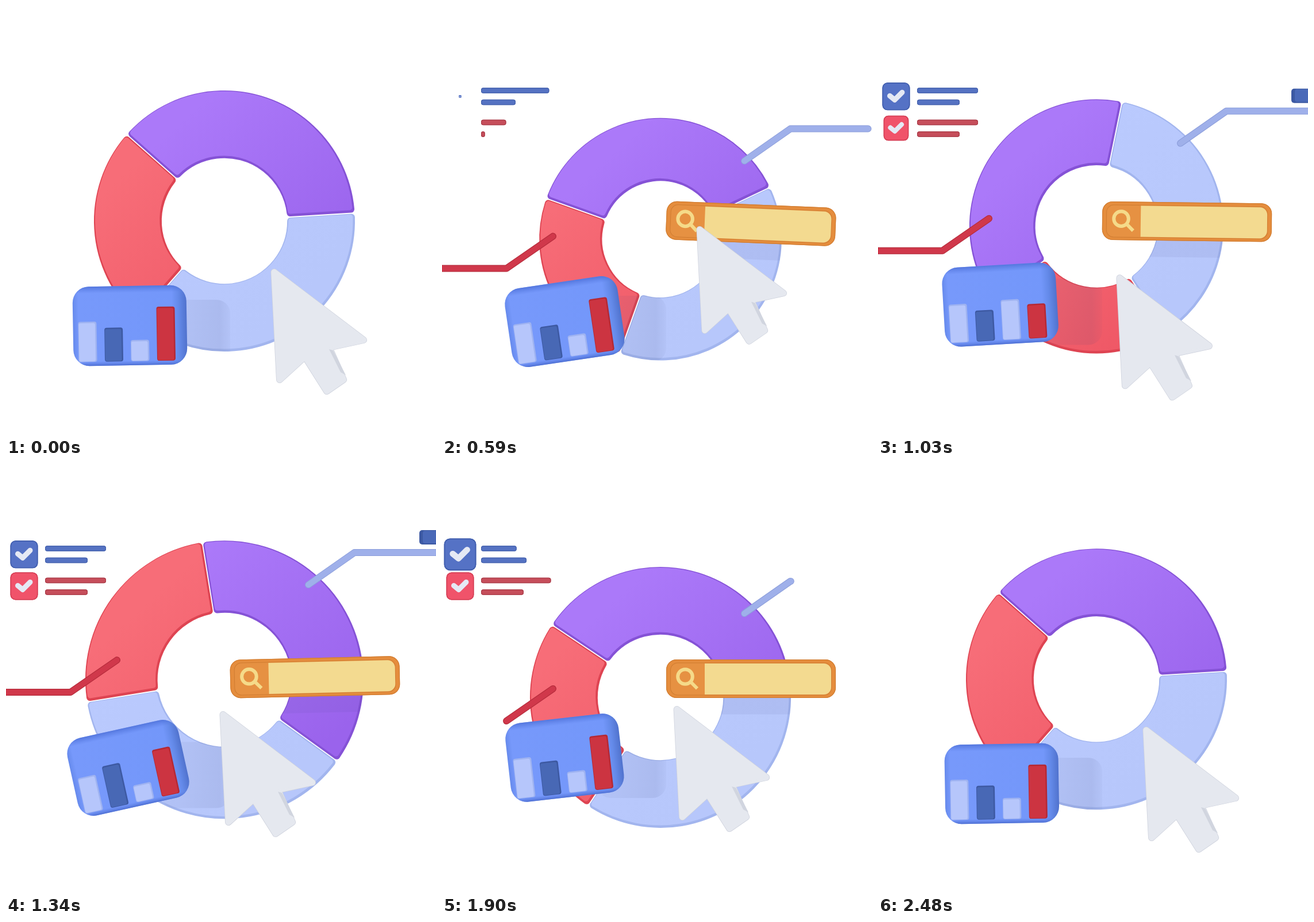
An HTML page with a canvas that plays this animation: 748x748 px, repeating every 2.52 s.

```html
<!DOCTYPE html>
<html>
<head>
<meta charset="utf-8">
<style>
html, body { margin: 0; width: 100%; height: 100%; overflow: hidden; background: #fff; }
canvas { display: block; width: 100%; height: 100%; }
</style>
</head>
<body>
<canvas id="stage" width="748" height="748"></canvas>
<script>
const ctx = document.getElementById('stage').getContext('2d');
const { PI, sin, cos, min, max } = Math;
const LOOP = 2520, RAD = PI / 180;

// Quintic ease from 0 to 1 between two times.
function ease(t, from, to) {
  const u = min(1, max(0, (t - from) / (to - from)));
  return u * u * u * (10 - 15 * u + 6 * u * u);
}

// Bump of height 1 around a moment.
function pulse(t, middle, reach = 310) {
  const u = (t - middle) / reach;
  return Math.abs(u) < 1 ? cos(u * PI / 2) ** 2 : 0;
}

// Grow past full size and settle; the exit is the same move reversed.
function pop(t, start, end) {
  const u = min(1, max(0, min(t - start, end - t) / 240));
  return ease(u, 0, 1) + .4 * sin(PI * u);
}

// Smooth curve through a few [time, value] poses, without overshoot.
function through(...keys) {
  const slope = i => (keys[i + 1][1] - keys[i][1]) / (keys[i + 1][0] - keys[i][0]);
  const tangent = keys.map((_, i) => {
    if (i === 0 || i === keys.length - 1) return 0;
    const a = slope(i - 1), b = slope(i);
    return a * b > 0 ? 2 * a * b / (a + b) : 0;
  });
  return t => {
    let i = 0;
    while (i < keys.length - 2 && t > keys[i + 1][0]) i++;
    const [t0, a] = keys[i], [t1, b] = keys[i + 1];
    const h = t1 - t0, u = min(1, (t - t0) / h), v = 1 - u;
    return a * v * v * (1 + 2 * u) + b * u * u * (3 - 2 * u)
      + h * (tangent[i] * u * v * v - tangent[i + 1] * u * u * v);
  };
}

const cardY = through([0, 556], [280, 529.5], [590, 549], [1030, 519.5], [1340, 528.5], [1900, 511], [2480, 556]);
const cardTurn = through([0, -1], [590, -8.4], [1030, -3.3], [1340, -12.5], [1900, -6.5], [2480, -1]);
const cursorX = through([0, 461], [280, 428], [590, 443], [1030, 415], [1340, 372], [1900, 403], [2200, 461]);
const cursorY = through([0, 456], [280, 381], [590, 382], [970, 469], [1340, 429], [1900, 420], [2200, 456]);

const ringY = t => 390 - 16 * cos(2 * PI * t / (LOOP / 2));
const ringRadius = t => 227 - 18.4 * ease(t, 290, 700) + 33.4 * ease(t, 796, 1340) - 15 * ease(t, 1400, 1900);
// Wind up backwards, then one full turn.
const ringSpin = t => -78 * ease(t, 385, 930) + 438 * ease(t, 926, 2046);

const searchSize = t => ease(t, 100, 360) - ease(t, 1930, 2180);
const searchTurn = t => -90 * (1 - ease(t, 100, 393)) - 75 * ease(t, 1930, 2180)
  + 2.4 * cos(PI * (t - 590) / 1100) * (1 - ease(t, 1340, 1900));

const leaderY = t => ringY(t) - 156.8 + .0057 * t - 1.07 * (ringRadius(t) - 227);
const leaderLength = t => min(.46 * (t - 85), .55 * (2080 - t));

function at(x, y, turn, size, draw) {
  if (size <= 0) return;
  ctx.save();
  ctx.translate(x, y);
  ctx.rotate(turn * RAD);
  ctx.scale(size, size);
  draw();
  ctx.restore();
}

function box(x, y, w, h, r, fill, edge, line = 1.5) {
  if (w <= 0 || h <= 0) return;
  ctx.beginPath();
  ctx.roundRect(x, y, w, h, r);
  ctx.fillStyle = fill;
  ctx.fill();
  if (edge) {
    ctx.save();
    ctx.clip();
    ctx.strokeStyle = edge;
    ctx.lineWidth = line * 2;
    ctx.stroke();
    ctx.restore();
  }
}

function polyline(points, width, color, closed) {
  ctx.beginPath();
  points.forEach(p => ctx.lineTo(...p));
  if (closed) ctx.closePath();
  ctx.lineJoin = ctx.lineCap = 'round';
  ctx.lineWidth = width;
  ctx.strokeStyle = color;
  ctx.stroke();
}

function gradient(x0, y0, x1, y1, ...stops) {
  const g = ctx.createLinearGradient(x0, y0, x1, y1);
  stops.forEach(([p, c]) => g.addColorStop(p, c));
  return g;
}

function segment(from, to, R, inset, corner, fill) {
  const c = inset + corner, gap = .9 + c, outer = R - c, inner = R * .481 + c;
  const da = Math.asin(gap / outer), db = Math.asin(gap / inner);
  ctx.beginPath();
  ctx.arc(0, 0, outer, from * RAD + da, to * RAD - da);
  ctx.arc(0, 0, inner, to * RAD - db, from * RAD + db, true);
  ctx.closePath();
  ctx.fillStyle = ctx.strokeStyle = fill;
  ctx.lineJoin = 'round';
  ctx.lineWidth = corner * 2;
  ctx.fill();
  ctx.stroke();
}

function drawRing(t) {
  const R = ringRadius(t);
  let from = 221.5 + ringSpin(t);
  const parts = [
    [135, '#8552d6', '#ab79f9', '#9a63ec'],
    [135, '#a2b5ee', '#bacafe', '#b7c7fb'],
    [90, '#de4452', '#f76d78', '#ef5866']
  ];
  at(380, ringY(t), 0, 1, () => {
    for (const [sweep, edge, light, dark] of parts) {
      segment(from, from + sweep, R, 0, 6, edge);
      ctx.save();
      ctx.translate(-.8, -1.6);
      segment(from, from + sweep, R, 2.8, 5, gradient(-R * .5, -R * .6, R * .6, R * .6, [0, light], [1, dark]));
      ctx.restore();
      from += sweep;
    }
  });
}

// Shadows fall only on the ring painted before them.
function drawShadows(t) {
  ctx.save();
  ctx.globalCompositeOperation = 'source-atop';
  box(270, cardY(t) - 45, 120, 115, 24,
    gradient(300, 0, 390, 0, [0, 'rgba(60,70,120,.05)'], [.8, 'rgba(60,70,120,.1)'], [1, 'rgba(60,70,120,.03)']));
  at(414, 373.5, searchTurn(t), searchSize(t), () => box(0, 10, 262, 52, 16, 'rgba(60,60,130,.07)'));
  ctx.restore();
}

// Part of a path measured from its start.
function trim(points, length) {
  const out = [points[0]];
  for (let i = 1; i < points.length && length > 0; i++) {
    const [x, y] = points[i - 1], dx = points[i][0] - x, dy = points[i][1] - y;
    const full = Math.hypot(dx, dy), k = min(1, length / full);
    out.push([x + dx * k, y + dy * k]);
    length -= full;
  }
  return out;
}

function drawLeaders(t) {
  const length = leaderLength(t), y = leaderY(t);
  if (length <= 0) return;
  const right = trim([[526, y], [606, y - 56], [860, y - 56]], length);
  const left = trim([[193, y + 131], [112, y + 187], [-140, y + 187]], length);
  polyline(left, 12, '#b72c3c');
  polyline(left, 9.5, '#d0384b');
  polyline(right, 12, '#8c9edb');
  polyline(right, 10, '#9fb0ea');
  at(768, y - 82.5, 0, pop(t, 700, 1660), () => {
    box(-49, -12.5, 100, 25, 5, '#3c59a3');
    box(-43, -11.5, 94, 22, 4, '#4a69b8');
  });
}

function drawList(t) {
  for (let i = 0; i < 4; i++) {
    const blue = i < 2, width = i % 2 ? 74 : 106;
    const y = 147 + 20.5 * (i % 2) + (blue ? 0 : 55.5);
    const grown = pop(t, 436 + 46 * i, 1984 + 62 * i);
    box(68, y - 4.8, width * grown, 9.6, 4, blue ? '#5572c2' : '#c64e5b', blue ? '#4461ad' : '#a93b47', 1.2);
  }
  const check = (y, fill, edge, size) => at(31.5, y, 0, size, () => {
    box(-24, -24, 48, 48, 9, fill, edge, 1.6);
    polyline([[-11, -1], [-2.5, 6], [10.5, -7]], 9, '#e5e9f4');
  });
  check(157.3, '#5572c5', '#425fae', pop(t, 574, 2070));
  check(212.5, '#f0536a', '#d33e54', pop(t, 910, 2260));
}

function drawSearch(t) {
  at(414, 373.5, searchTurn(t), searchSize(t), () => {
    box(-24, -33.5, 295, 67, 18, '#e58d3d', '#d17d32', 1.2);
    box(-17, -28, 281, 57, 13, '#e69142', '#cf7c31', 1);
    box(43, -26.5, 220, 54, [0, 13, 13, 0], '#f3da90');
    ctx.beginPath();
    ctx.arc(9, -3.5, 12.8, 0, 2 * PI);
    ctx.moveTo(18, 5);
    ctx.lineTo(30, 17);
    ctx.lineCap = 'butt';
    ctx.lineWidth = 6;
    ctx.strokeStyle = '#f5da89';
    ctx.stroke();
  });
}

function drawCard(t) {
  const first = pulse(t, 1030), second = pulse(t, 1340);
  const light = ['#b6c6fb', '#9fb3f1'], dark = ['#4868b5', '#3d59a2'], red = ['#cc3441', '#b42935'];
  const bars = [
    [70 - 3 * first - 7 * second, light],
    [59 - 5 * first + 15 * second, dark],
    [37 + 33 * first - 7 * second, light],
    [94 - 34 * first - 11 * second, red]
  ];
  at(215.5 - 3 * sin(PI * t / LOOP), cardY(t), cardTurn(t), 1, () => {
    box(-99, -69, 198, 138, 28, gradient(-99, 0, 99, 0,
      [0, '#668aec'], [.05, '#7799fb'], [.87, '#7397fa'], [.93, '#648ae9'], [1, '#5072cd']));
    box(-99, -69, 198, 138, 28, gradient(0, -69, 0, 69,
      [0, 'rgba(73,108,212,.75)'], [.085, 'rgba(83,118,222,0)'], [.94, 'rgba(83,118,222,0)'], [1, 'rgba(68,101,200,.8)']));
    bars.forEach(([h, [fill, edge]], i) => {
      const x = -90 + 45.5 * i;
      box(x, 62 - h, 32, h, 4, edge);
      box(x + 1, 64.5 - h, 28.5, h - 3.5, 3, fill);
    });
  });
}

function drawCursor(t) {
  const shape = [[5.5, 7], [161, 125], [101, 138], [126, 194], [97, 214], [59, 154], [15, 194]];
  at(cursorX(t), cursorY(t), 0, 1 - .06 * pulse(t, 590), () => {
    polyline(shape, 12, '#cdd1dc', true);
    polyline(shape, 10.5, '#e5e8ef', true);
    ctx.fillStyle = '#e5e8ef';
    ctx.fill();
    ctx.beginPath();
    ctx.moveTo(101, 141);
    ctx.lineTo(108, 143);
    ctx.lineTo(130, 186);
    ctx.lineTo(121, 181);
    ctx.fillStyle = '#d1d5df';
    ctx.fill();
  });
}

const layers = [drawRing, drawShadows, drawLeaders, drawList, drawSearch, drawCard, drawCursor];

function frame() {
  const t = performance.now() % LOOP;
  ctx.clearRect(0, 0, 748, 748);
  layers.forEach(draw => draw(t));
  requestAnimationFrame(frame);
}
frame();
</script>
</body>
</html>
```
